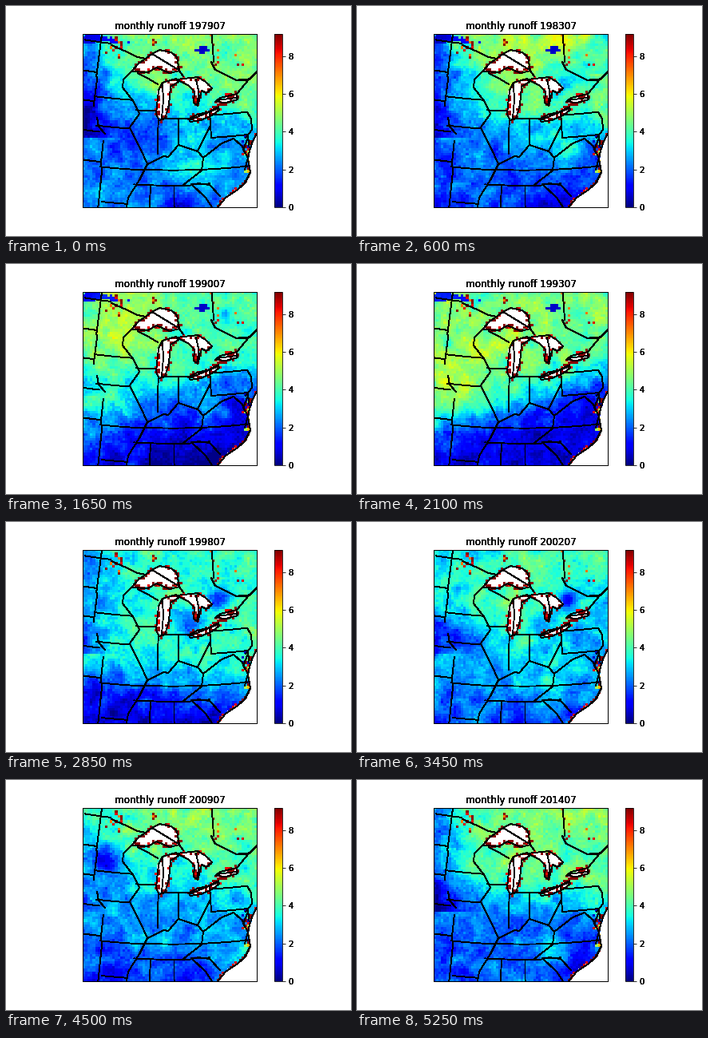
Animation, 432 px wide and 288 px high, one loop 5.4 s. Source, as a matplotlib script:

```python
import numpy as np
import matplotlib.pyplot as plt
from matplotlib.animation import FuncAnimation
from matplotlib.path import Path

W, H, N = 432, 288, 70
LEFT, RIGHT, TOP, BOTTOM = 96, 314, 35, 252
VMAX = 9.18
FIRST, YEARS = 1979, 36
plt.rcParams["font.family"] = "DejaVu Sans"

# Wet north, dry south: levels, position and tilt of the front, dry west,
# then local spots as x, y, radius, change
CLIMATE = {
    1979: (4.6, 2.4, 0.38, 0.2, 2.0, [(165, 175, 24, -0.9), (240, 200, 24, 1.3), (222, 252, 20, -1.5)]),
    1986: (4.4, 0.7, 0.56, 0.0, 1.8, [(262, 178, 10, 3.0), (140, 190, 22, 0.8)]),
    1993: (4.5, 0.7, 0.64, -0.35, 0.0, [(125, 155, 18, 0.9), (145, 100, 20, 0.6)]),
    1998: (3.8, 0.7, 0.78, 0.12, 1.5, [(228, 128, 13, -2.0), (266, 97, 10, -2.2)]),
    2005: (4.1, 1.6, 0.40, 0.05, 0.5, [(230, 235, 25, 2.3), (270, 195, 24, 1.6), (265, 97, 7, -2.4)]),
    2009: (4.5, 2.7, 0.33, 0.3, 0.6, [(127, 102, 12, -2.0), (130, 245, 32, -1.6), (230, 248, 25, -1.3)]),
    2014: (4.5, 1.9, 0.50, 0.1, 2.3, [(243, 213, 9, 1.8), (285, 235, 22, -0.9)]),
}

# Straight borders: latitude, from and to longitude
PARALLELS = [(49, -99, -95.1), (45.94, -99, -96.6), (43.5, -96.5, -91.2), (43, -99, -96.5),
             (40.6, -95.8, -91.5), (40, -99, -95.3), (37, -99, -94.6), (36.5, -94.6, -89.5),
             (33, -94, -91.2), (42.5, -90.6, -87.8), (41.73, -87, -83.5), (42, -79.8, -75.4),
             (39.72, -80.5, -75.8), (36.55, -89.5, -75.9), (35, -90.3, -83.1), (35.1, -83.1, -81)]
# Longitude, from and to latitude
MERIDIANS = [(-96.6, 45.5, 51), (-96.45, 42.5, 45.5), (-94.62, 36.5, 39.1), (-94.4, 32, 36.5),
             (-87.53, 38.2, 41.7), (-84.81, 39.1, 41.7), (-80.52, 39.7, 42.3),
             (-88.3, 32, 35), (-85.4, 32, 35), (-75.7, 38.4, 39.7), (-79.5, 47.3, 51)]

# Rivers and shores as a few key points on the stage
RIVERS = [
    "157 82 147 92 146 102 160 120 167 135 155 152 168 178 177 198 167 218 153 240 151 252",
    "177 198 198 188 203 189 216 174 225 177 240 182 244 173 256 150",
    "114 140 116 151 124 160", "222 224 245 206 247 190 270 172 285 166 295 175 301 186",
    "240 222 255 224 268 238", "232 223 250 240 258 252", "240 182 247 190",
    "132 49 148 56 165 64 175 66", "165 84 180 92 190 98", "183 60 216 80 222 88",
    "257 70 262 80 275 86 288 93", "289 110 304 92", "302 133 307 141 308 155 300 165",
    "303 165 297 180 303 190 299 205", "196 98 197 118 195 140", "238 92 241 106 240 124",
    "232 142 266 128", "264 118 288 115",
]
ST_LAWRENCE = "288 93 304 92 314 83"
LAKES = [
    "157 82 166 72 183 60 192 55 207 58 214 64 217 81 205 84 188 77 178 83 157 82",
    "196 96 213 91 216 95 206 101 204 124 199 141 192 143 188 135 191 106 196 96",
    "214 92 240 89 250 95 258 103 251 109 245 106 240 125 235 121 236 107 229 100 214 92",
    "229 141 240 136 255 132 266 126 267 130 258 137 244 143 231 145 229 141",
    "262 120 268 115 289 110 290 117 276 121 262 120",
]
COAST = "314 160 309 169 305 181 303 192 306 208 299 222 290 230 275 240 265 252"

X = LEFT + (np.arange(N) + 0.5) * (RIGHT - LEFT) / N
Y = TOP + (np.arange(N) + 0.5) * (BOTTOM - TOP) / N
XX, YY = np.meshgrid(X, Y)
U, V = (XX - LEFT) / (RIGHT - LEFT), (YY - TOP) / (BOTTOM - TOP)


def project(lon, lat):
    """Conic projection, in stage pixels."""
    scale, rho0 = 12.4, 789
    theta = np.radians(0.669 * (lon + 85.5))
    rho = rho0 + scale * (42 - lat)
    return 209.5 + rho * np.sin(theta), 138 + rho * np.cos(theta) - rho0


def pairs(text):
    return np.array(text.split(), float).reshape(-1, 2)


def stretch(grid):
    """Bilinear resize of a coarse grid to the map grid."""
    t = np.linspace(0, 1, N)
    knots = np.linspace(0, 1, len(grid))
    wide = np.array([np.interp(t, knots, row) for row in grid])
    return np.array([np.interp(t, knots, col) for col in wide.T]).T


def rough(rng, n, amount):
    return stretch(rng.normal(0, amount, (n, n)))


def bump(x, y, r, amp):
    return amp * np.exp(-((XX - x) ** 2 + (YY - y) ** 2) / (2 * r * r))


def inside(points):
    cells = np.column_stack([XX.ravel(), YY.ravel()])
    return Path(points).contains_points(cells).reshape(N, N)


def grow(mask):
    p = np.pad(mask, 1)
    return p[1:-1, 1:-1] | p[:-2, 1:-1] | p[2:, 1:-1] | p[1:-1, :-2] | p[1:-1, 2:]


def pattern(north, south, front, tilt, west, spots):
    edge = front + tilt * (U - 0.5)
    z = south + (north - south) / (1 + np.exp((V - edge) / 0.07))
    z = z - west * np.exp(-(U / 0.16) ** 2) * (V < 0.6)
    return z + sum(bump(*s) for s in spots)


fixed = np.random.default_rng(11)
lakes = np.any([inside(pairs(p)) for p in LAKES], axis=0)
sea = inside(np.vstack([pairs(COAST), [(316, 254), (316, 160)]]))
water = lakes | sea
draw = fixed.random((N, N))
rim = (grow(lakes) & ~lakes) | (lakes & grow(~lakes))
shore = (rim & (draw < 0.42)) | (grow(sea) & ~sea & (draw < 0.7))
speckle = np.full((N, N), np.nan)
speckle[shore] = fixed.choice([9.1, 9.1, 9.1, 8.3], shore.sum())
bay = (np.hypot((XX - 300) / 6, (YY - 188) / 27) < 1) & (fixed.random((N, N)) < 0.45)
speckle[bay] = fixed.choice([9.1, 8.5, 5, 6.5, 0.6, np.nan], bay.sum())
water = water & np.isnan(speckle)

# Small lakes: clusters as x, y, spread, count
for x, y, spread, count in [(137, 50, 7, 12), (184, 45, 3, 6), (275, 60, 18, 9)]:
    px = np.clip(fixed.normal(x, spread, count), LEFT, RIGHT - 1)
    py = np.clip(fixed.normal(y, spread, count), TOP, 80)
    rows = ((py - TOP) / (BOTTOM - TOP) * N).astype(int)
    cols = ((px - LEFT) / (RIGHT - LEFT) * N).astype(int)
    speckle[rows, cols] = fixed.choice([9.1, 9.1, 8.4, 7.2], count)

texture = fixed.normal(0, 0.1, (N, N)) + rough(fixed, 24, 0.25)
pond = np.hypot((XX - 245) / 8, (YY - 55) / 4) + texture < 0.9
corner = np.hypot((XX - 105) / 32, (YY - 41) / 7) + texture < 0.9
KEYS = sorted(CLIMATE)
PATTERNS = {k: pattern(*CLIMATE[k]) for k in KEYS}


def runoff(year):
    rng = np.random.default_rng(year)
    a = max(k for k in KEYS if k <= year)
    b = min(k for k in KEYS if k >= year)
    t = (year - a) / max(b - a, 1)
    z = (1 - t) * PATTERNS[a] + t * PATTERNS[b]
    z = z + rough(rng, 5, 1.2 * np.sqrt(t * (1 - t)))
    z = z + texture + rough(rng, 18, 0.35) + rng.normal(0, 0.15, (N, N))
    if year < 1996:
        z[pond] = 0.6
        z[corner] *= 0.3
    z = np.clip(z, 0.1, 6)
    z = np.where(np.isnan(speckle), z, speckle)
    z[water] = np.nan
    return z


def place(left, top, right, bottom):
    return fig.add_axes([left / W, 1 - bottom / H, (right - left) / W, (bottom - top) / H])


def label(x, y, s, **kw):
    """Stacked text, for solid edges."""
    return [fig.text(x / W, 1 - y / H, s, **kw) for _ in range(5)]


def trace(xs, ys, lw=0.9):
    ax.plot(xs, ys, color="k", lw=lw, antialiased=False)


fig = plt.figure(figsize=(W / 72, H / 72), dpi=72, facecolor="white")
ax = place(LEFT, TOP, RIGHT, BOTTOM)
image = ax.imshow(runoff(FIRST), cmap="jet", vmin=0, vmax=VMAX, interpolation="nearest",
                  extent=(LEFT, RIGHT, BOTTOM, TOP), aspect="auto")
for lat, a, b in PARALLELS:
    trace(*project(np.linspace(a, b, 20), lat))
for lon, a, b in MERIDIANS:
    trace(*project(lon, np.linspace(a, b, 20)))
for line in RIVERS + LAKES + [COAST]:
    trace(*pairs(line).T)
trace(*pairs(ST_LAWRENCE).T, lw=1.6)
ax.set(xlim=(LEFT, RIGHT), ylim=(BOTTOM, TOP), xticks=[], yticks=[])
for spine in ax.spines.values():
    spine.set_linewidth(1)

bar = place(336, TOP, 346, BOTTOM)
fig.colorbar(image, cax=bar, ticks=range(0, 9, 2))
bar.tick_params(length=3.5, width=0.8, labelright=False)
for v in range(0, 9, 2):
    label(353.5, BOTTOM - v / VMAX * (BOTTOM - TOP), str(v), size=10, va="center_baseline")
title = label((LEFT + RIGHT) / 2 + 0.5, 29, "", size=12, ha="center", va="baseline")


def update(i):
    image.set_data(runoff(FIRST + i))
    for t in title:
        t.set_text(f"monthly runoff {FIRST + i}07")
    return [image, *title]


anim = FuncAnimation(fig, update, frames=YEARS, interval=150, repeat=True, repeat_delay=0,
                     blit=False)
plt.show()
```
